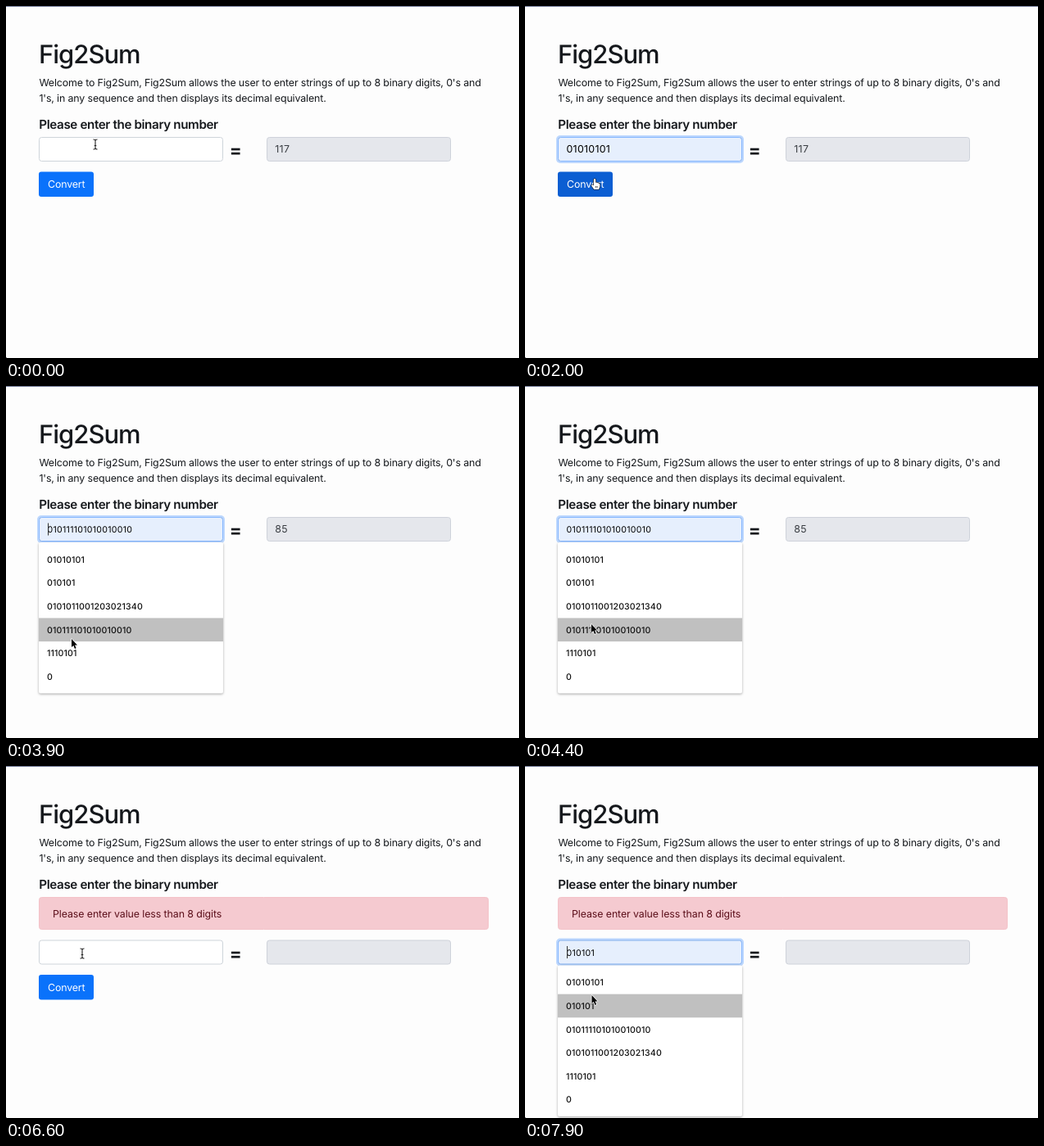
An HTML page with a canvas for the animation above (8000 ms loop, 626 px wide and 430 px high).

```html
<!DOCTYPE html>
<html lang="en">
<head>
<meta charset="utf-8">
<title>Fig2Sum</title>
<style>
html, body { margin: 0; width: 100%; height: 100%; overflow: hidden; background: #fdfdfd; }
canvas { display: block; }
</style>
</head>
<body>
<canvas id="stage" width="626" height="430"></canvas>
<script>
const ctx = document.getElementById('stage').getContext('2d');
const LOOP = 8000, ROW = 28.65, SUBMIT_1 = 2220, SUBMIT_2 = 5680;
const INK = '#15181c', DIGIT_GAP = .27;
const LONG = '010111101010010010', LONGER = '0101011001203021340';

// Pointer path: time, x, y
const path = [
  [0, 109, 169], [350, 109, 169], [800, 84, 209], [1600, 84, 209], [1900, 85, 211],
  [2900, 85, 211], [3150, 93, 171], [3700, 93, 171], [3900, 80, 309], [4100, 81, 291],
  [4650, 81, 291], [5050, 91, 219.5], [5600, 91, 219.5], [5680, 93, 229], [7650, 93, 229],
  [7780, 82, 304], [7900, 81.5, 280], [LOOP, 81.5, 280]
];
const menuTimes = [[250, 1050], [3180, 4620], [6700, LOOP]];
const focusTimes = [[100, 2150], [3180, 5450], [6680, LOOP]];
const caretTimes = [[100, 700], [3180, 4350], [6680, 7300], [7700, LOOP]];
const pressTimes = [[2120, SUBMIT_1], [5560, SUBMIT_2]];

const during = (spans, t) => spans.some(([a, b]) => t >= a && t < b);
const clamp = v => Math.max(0, Math.min(1, v));

// Fades in and out over 150 ms
function fade(spans, t) {
  return Math.max(...spans.map(([a, b]) => Math.min(clamp((t - a) / 150), 1 - clamp((t - b) / 150))));
}

function pointerAt(t) {
  const i = path.findIndex(p => p[0] > t);
  const [t0, x0, y0] = path[i - 1], [t1, x1, y1] = path[i];
  const k = (t - t0) / (t1 - t0), e = k * k * (3 - 2 * k);
  return { x: x0 + (x1 - x0) * e, y: y0 + (y1 - y0) * e };
}

function text(str, x, y, size = 12.4, color = INK, weight = 400, spacing = 0) {
  ctx.font = `${weight} ${size}px Inter, sans-serif`;
  ctx.letterSpacing = spacing + 'px';
  ctx.fillStyle = color;
  ctx.fillText(str, x, y);
}

function box(x, y, w, h, fill, stroke, radius = 3) {
  ctx.beginPath();
  ctx.roundRect(x, y, w, h, radius);
  ctx.fillStyle = fill;
  ctx.fill();
  if (stroke) {
    ctx.strokeStyle = stroke;
    ctx.lineWidth = 1;
    ctx.stroke();
  }
}

function ring(x, y, w, h, amount) {
  if (amount > 0) box(x - 2.5, y - 2.5, w + 5, h + 5, `rgba(13,110,253,${0.27 * amount})`, null, 5);
}

function shape(d, fill, stroke, width) {
  const p = new Path2D(d);
  ctx.lineWidth = width;
  ctx.lineJoin = 'round';
  ctx.strokeStyle = stroke;
  ctx.stroke(p);
  if (fill) {
    ctx.fillStyle = fill;
    ctx.fill(p);
  }
}

const cursors = {
  beam() {
    const d = 'M-2.5 -6Q0 -6 0 -4.5Q0 -6 2.5 -6M0 -4.5V4.5M-2.5 6Q0 6 0 4.5Q0 6 2.5 6M-1.3 1.5H1.3';
    shape(d, null, 'rgba(255,255,255,.8)', 2.4);
    shape(d, null, '#222', 1.1);
  },
  arrow() {
    shape('M0 0V10L2.3 8L4 12L5.6 11.3L4 7.4H7Z', '#000', '#fff', 1.4);
  },
  hand() {
    shape('M-1.2 7V.8Q0 -.8 1.2 .8V4.8Q2.6 4 3.3 5.3Q4.6 4.7 5 6Q6.3 5.6 6.4 7V9.5L5 13H-.8L-3.9 8.4Q-3.7 6.6 -2.2 7.6L-1.2 8.6Z',
      '#fff', '#111', 1.2);
    shape('M1.3 9V11M3.1 9V11', null, '#111', .7);
  }
};

function drawMenu(rows, shift, active) {
  ctx.save();
  ctx.shadowColor = 'rgba(0,0,0,.35)';
  ctx.shadowBlur = 3;
  ctx.shadowOffsetY = 1;
  box(40, 191 + shift, 225, 184.5, '#fff', null, 2);
  ctx.restore();
  rows.forEach((row, i) => {
    const top = 197.5 + shift + i * ROW;
    if (i === active) {
      ctx.fillStyle = '#c0c0c0';
      ctx.fillRect(40, top, 225, ROW);
    }
    text(row, 50, top + 18.2, 10.6, '#111', 500, .13);
  });
}

function draw(t) {
  const failed = t >= SUBMIT_2, shift = failed ? 52.5 : 0;
  const pointer = pointerAt(t), py = pointer.y - shift;
  const open = during(menuTimes, t), focus = fade(focusTimes, t);
  const rows = ['01010101', '010101', ...(failed ? [LONG, LONGER] : [LONGER, LONG]), '1110101', '0'];
  const active = open ? Math.floor((py - 197.5) / ROW) : -1;
  const preview = rows[active];
  const value = t >= 1050 && t < SUBMIT_1 ? rows[0] : t >= 4620 && !failed ? LONG : '';
  const result = t < SUBMIT_1 ? '117' : failed ? '' : '85';
  const overInput = py > 160 && py < 190;
  const overButton = !open && py > 203 && py < 233;

  ctx.fillStyle = '#fdfdfd';
  ctx.fillRect(0, 0, 626, 430);
  ctx.fillStyle = '#717a98';
  ctx.fillRect(0, 0, 626, 1);
  ctx.fillStyle = '#777';
  ctx.fillRect(0, 429, 1, 1);

  text('Fig2Sum', 40, 70, 31, INK, 500, -1);
  text("Welcome to Fig2Sum, Fig2Sum allows the user to enter strings of up to 8 binary digits, 0's and", 40.4, 98, 12.4, INK, 400, -.14);
  text("1's, in any sequence and then displays its decimal equivalent.", 40.4, 117, 12.4, INK, 400, -.13);
  text('Please enter the binary number', 40.3, 149.5, 15.2, INK, 600, -.38);

  if (failed) {
    box(40.5, 160.5, 548, 39, '#f5cad0', '#f4c2c8');
    text('Please enter value less than 8 digits', 57, 184.5, 12.4, '#5c0f1a', 400, -.1);
  }

  ctx.save();
  ctx.translate(0, shift);
  ring(40.5, 160.5, 224, 29, focus);
  box(40.5, 160.5, 224, 29, value || preview ? '#e6effd' : '#fff', '#ced4da');
  if (focus > 0) box(40.5, 160.5, 224, 29, 'transparent', `rgba(134,183,254,${focus})`);
  if (preview) text(preview, 50.5, 179.3, 10.6, '#000', 400, DIGIT_GAP);
  else text(value, 50.5, 179.2, 12.4, '#000', 400, DIGIT_GAP);
  if (during(caretTimes, t)) {
    ctx.fillStyle = '#333';
    ctx.fillRect(51, 167.5, 1, 15);
  }

  text('=', 272.8, 184, 22, INK, 700);
  box(318.5, 160.5, 224, 29, '#e5e7ec', '#ced2da');
  text(result, 328.3, 179.2, 12.4, '#3a3e43', 400, DIGIT_GAP);

  ring(40, 202.5, 67, 30.5, fade(pressTimes, t));
  box(40, 202.5, 67, 30.5, overButton ? '#0b5ed2' : '#0a72fb');
  text('Convert', 51, 222.4, 12.4, '#fff', 400, -.14);
  ctx.restore();

  if (open) drawMenu(rows, shift, active);

  ctx.save();
  ctx.translate(pointer.x, pointer.y);
  cursors[overInput ? 'beam' : overButton ? 'hand' : 'arrow']();
  ctx.restore();
}

ctx.textRendering = 'geometricPrecision';
function frame() {
  draw(performance.now() % LOOP);
  requestAnimationFrame(frame);
}
frame();
</script>
</body>
</html>
```
